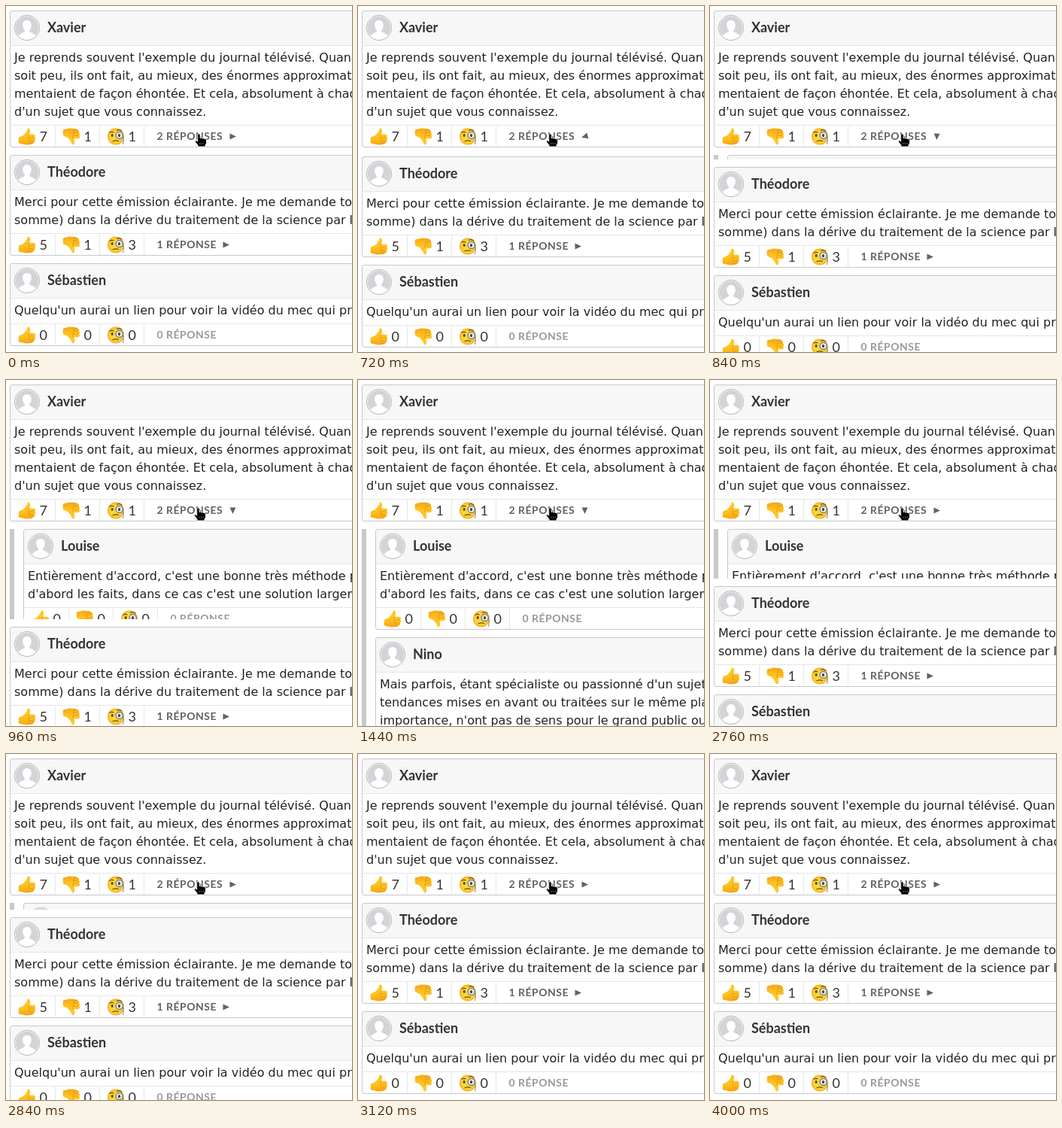
An HTML page that plays this animation: 460x460 px, repeating every 4.36 s.

```html
<!DOCTYPE html>
<html lang="fr">
<head>
<meta charset="utf-8">
<title>Commentaires</title>
<style>
  html, body { margin: 0; width: 100%; height: 100%; overflow: hidden; background: #fff; }
  svg { display: block; width: 460px; height: 460px; }
  .name { font: 700 18px Lato, sans-serif; fill: #333; }
  .body { font: 16px "DejaVu Sans", sans-serif; fill: #222; }
  .count { font: 18px Lato, sans-serif; fill: #333; }
  .reply { font: 700 14px Lato, sans-serif; letter-spacing: .5px; fill: #626262; }
  .reply.none { fill: #999; }
  .rule { stroke: #e6e6e6; fill: none; }
</style>
</head>
<body>
<svg viewBox="0 0 460 460" xmlns="http://www.w3.org/2000/svg">
  <defs>
    <linearGradient id="skin" x1="0" y1="0" x2="0" y2="1">
      <stop offset="0" stop-color="#ffca28"/>
      <stop offset=".6" stop-color="#ffc021"/>
      <stop offset="1" stop-color="#f7a414"/>
    </linearGradient>
    <radialGradient id="face">
      <stop offset=".5" stop-color="#fdd835"/>
      <stop offset=".85" stop-color="#fcc62c"/>
      <stop offset="1" stop-color="#f2a222"/>
    </radialGradient>
    <clipPath id="disc"><circle r="15.5"/></clipPath>
    <clipPath id="fold"><rect id="window" y="188" width="460" height="0"/></clipPath>

    <g id="avatar">
      <circle r="16.5" fill="#fff" stroke="#b4b4b4"/>
      <g clip-path="url(#disc)">
        <circle r="15.5" fill="#d3d3d8"/>
        <path d="M0-10C4.300-10 6-7 5.800-3C5.600 0 4 2 3 3.200C3 5.600 4.500 6 7 7C10.500 8.400 11.500 10 12 16H-12C-11.500 10-10.500 8.400-7 7C-4.500 6-3 5.600-3 3.200C-4 2-5.600 0-5.800-3C-6-7-4.300-10 0-10Z" fill="#fff"/>
      </g>
    </g>

    <g id="thumb">
      <path d="M-11.300 2.500Q-11 .300-8.500 0C-5.500-.500-3.800-2.500-2-5C-.600-7 0-8 .200-9.600Q.800-11.400 2.600-10.800C4.800-10 4.600-6.500 3.300-2.800L8.800-2.700Q11.300-2.400 11.200-.400Q11 1.200 9.800 1.400Q11.500 2 11.200 3.700Q10.800 5.200 9.400 5.300Q10.600 6.200 10 7.500Q9.400 8.700 8 8.700Q8.600 11-6 11H-1C-4 11-5 9.800-7.500 9.700Q-11 9.800-11.300 8Z" fill="url(#skin)"/>
      <path d="M3.200-2.700Q1.200-2 1.500-.200Q1.700 1.200 3.500 1.400H9.800M3.500 1.400Q1.700 2 2 3.600Q2.300 5.200 4 5.300H9.400M4 5.300Q2.400 6 2.900 7.400Q3.300 8.700 4.800 8.700H8" fill="none" stroke="#e59a12" stroke-width=".9"/>
    </g>

    <g id="monocle">
      <circle r="11" fill="url(#face)"/>
      <ellipse cx="-4.800" cy="-1.500" rx="1.500" ry="2" fill="#5a4116"/>
      <path d="M-8-5.200Q-5.500-7-3-5.600M1.500-8.200Q5-10 8-7.300M-4 6.300Q-.500 4.600 3.500 6" fill="none" stroke="#6b4a14" stroke-width="1.200" stroke-linecap="round"/>
      <path d="M9.600 0Q11 4 9.500 10.500" fill="none" stroke="#7b858b" stroke-width="1"/>
      <circle cx="4.700" cy="-1.500" r="4.600" fill="#eceff1" stroke="#78838a" stroke-width="1.500"/>
      <ellipse cx="4.500" cy="-1.300" rx="1.600" ry="2.100" fill="#5a4116"/>
    </g>
  </defs>

  <g id="first"></g>
  <g id="replies" clip-path="url(#fold)"></g>
  <g id="rest"></g>
  <g id="cursor">
    <path d="M-3.700-8.500Q-1.800-9.500-.800-7.500V-3Q1-4 2-2.500Q3.700-3.400 4.500-2Q7.200-2.600 7.500 0V4L6 6.500V8.500H-4V6.500L-7.500 2.200Q-8 0-6 .200L-4.300 1.500V-7Z" fill="#000" stroke="#fff" stroke-width=".9"/>
    <path d="M-1 3V5.500M1.500 3V5.500M4 3V5.500" stroke="#888" stroke-width=".7"/>
  </g>
</svg>
<script>
const LOOP = 4360, OPEN = 460, CLOSE = 2345, TURN = 400, FULL = 350;
const $ = id => document.getElementById(id);

const label = (cls, x, y, s) => `<text class="${cls}" x="${x}" y="${y}">${s}</text>`;
const icon = (id, x, y, flip = 1) =>
  `<use href="#${id}" transform="translate(${x} ${y}) scale(1 ${flip})"/>`;

function card(x, y, name, lines, votes, replies, arrowId) {
  const h = 86 + 24 * lines.length, foot = h - 29, mid = h - 14.5;
  const cells = votes.map((n, i) => {
    const cx = 23.500 + 59 * i;
    return icon(i < 2 ? 'thumb' : 'monocle', cx - .5, mid, i === 1 ? -1 : 1) +
      label('count', cx + 16, h - 8.500, n) +
      `<path class="rule" d="M${60.500 + 59 * i} ${foot}V${h - 1}"/>`;
  }).join('');
  const word = replies > 1 ? ' RÉPONSES' : ' RÉPONSE';
  const ax = replies > 1 ? 296.500 : 287.500;
  const arrow = replies ? `<g transform="translate(${ax} ${mid})"><path ${arrowId ? `id="${arrowId}"` : ''}
    d="M-4-4L4.500 0L-4 4Z" fill="#626262"/></g>` : '';
  return `<g transform="translate(${x} ${y})">
    <rect x=".5" y=".5" width="480" height="${h - 1}" rx="2.500" fill="#fff"/>
    <path d="M1 46V3Q1 1 3 1H480V46Z" fill="#f7f7f7"/>
    <path class="rule" d="M1 46.500H480M1 ${foot - 4 + 3.500}H480"/>
    <rect x=".5" y=".5" width="480" height="${h - 1}" rx="2.500" fill="none" stroke="#c8c8c8"/>
    ${icon('avatar', 23, 23)}${label('name', 50, 29, name)}
    ${lines.map((s, i) => label('body', 6, 68 + 24 * i, s)).join('')}
    ${cells}${label(replies ? 'reply' : 'reply none', 195.500, h - 10, replies + word)}${arrow}
  </g>`;
}

$('first').innerHTML = card(5, 6, 'Xavier', [
  "Je reprends souvent l'exemple du journal télévisé. Quand",
  'soit peu, ils ont fait, au mieux, des énormes approximations',
  'mentaient de façon éhontée. Et cela, absolument à chaque',
  "d'un sujet que vous connaissez."], [7, 1, 1], 2, 'arrow');

$('replies').innerHTML = '<rect x="5" y="198" width="6" height="340" fill="#c8c8c8"/>' +
  card(23, 198, 'Louise', [
    "Entièrement d'accord, c'est une bonne très méthode pour",
    "d'abord les faits, dans ce cas c'est une solution largement"], [0, 0, 0], 0) +
  card(23, 342, 'Nino', [
    "Mais parfois, étant spécialiste ou passionné d'un sujet",
    'tendances mises en avant ou traitées sur le même plan',
    "importance, n'ont pas de sens pour le grand public ou"], [0, 0, 0], 0);

$('rest').innerHTML = card(5, 198, 'Théodore', [
    'Merci pour cette émission éclairante. Je me demande tout',
    'somme) dans la dérive du traitement de la science par les'], [5, 1, 3], 1) +
  card(5, 342, 'Sébastien', [
    "Quelqu'un aurai un lien pour voir la vidéo du mec qui présente"], [0, 0, 0], 0);

const clamp = v => Math.max(0, Math.min(1, v));
const ease = v => v * v * (3 - 2 * v);

// Height of the reply list: doubles every 40 ms, then halves likewise.
function height(t) {
  if (t < OPEN) return 0;
  const h = t < CLOSE ? 2 * 2 ** ((t - 720) / 40) : 77 * 2 ** ((2760 - t) / 40);
  return Math.round(Math.min(FULL, h));
}

function draw(t) {
  const h = height(t);
  const turn = ease(clamp((t - OPEN) / TURN)) - ease(clamp((t - CLOSE) / TURN));
  $('window').setAttribute('height', h);
  $('rest').setAttribute('transform', `translate(0 ${h})`);
  $('arrow').setAttribute('transform', `rotate(${-270 * turn})`);
  $('cursor').setAttribute('transform', `translate(${t < 400 ? 259 : 258} 178.500)`);
}

const start = performance.now();
function tick() {
  draw((performance.now() - start) % LOOP);
  requestAnimationFrame(tick);
}
draw(0);
requestAnimationFrame(tick);
</script>
</body>
</html>
```
